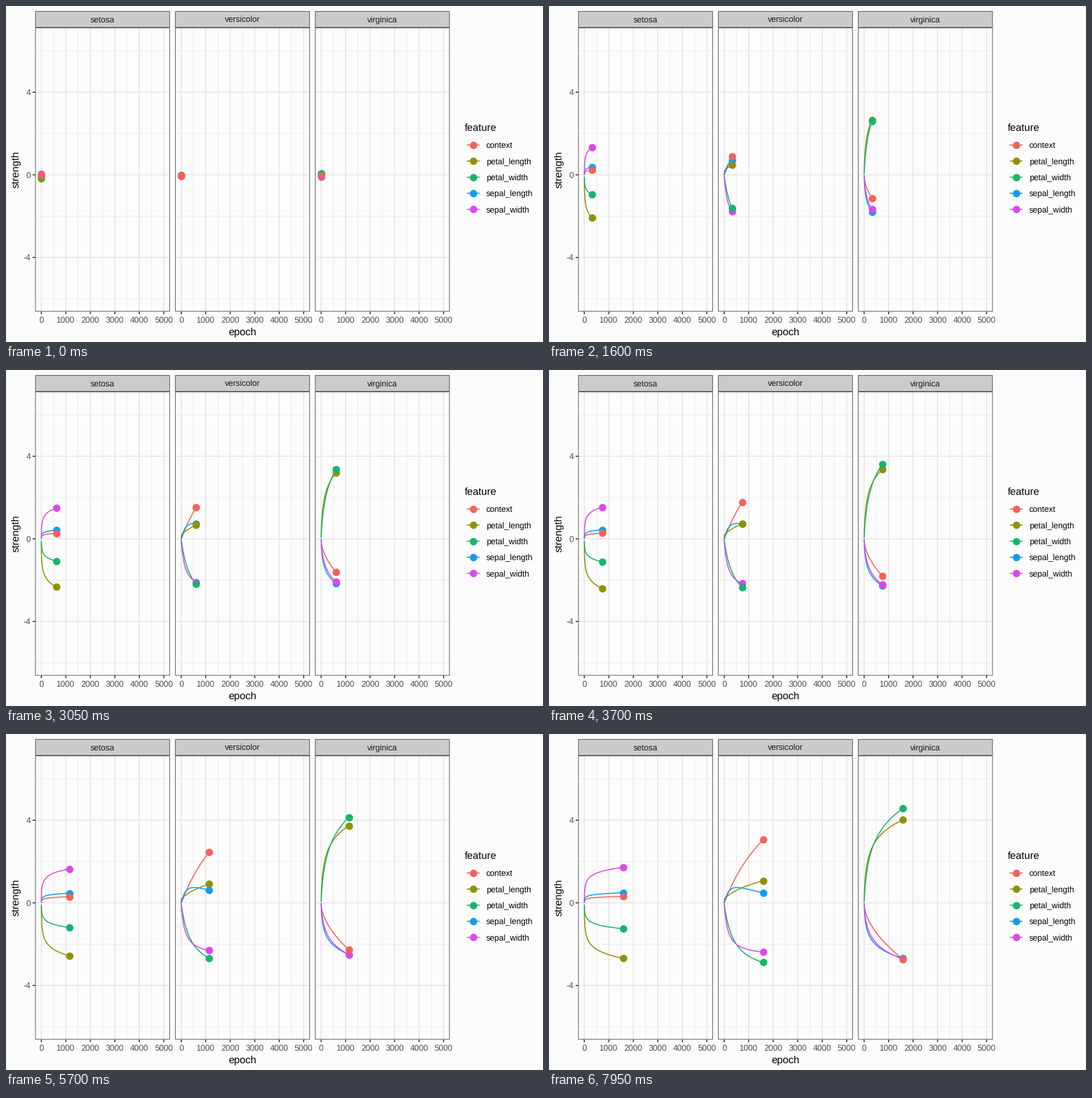
A matplotlib script for the animation above (8 s loop, 947x592 px).

```python
import numpy as np
import matplotlib.pyplot as plt
from matplotlib.animation import FuncAnimation
from matplotlib.patches import Rectangle

plt.rcParams["text.hinting"] = "none"

W, H, DPI = 947, 592, 100
PX = 72 / DPI  # points per pixel
FRAMES, INTERVAL, EPOCHS_PER_FRAME = 160, 50, 10

STRIP_TOP, TOP, BOTTOM = 9.1, 38.2, 538.4
LEFT, PANEL_W, GAP = 51.5, 237.6, 9.1
X_UNIT = PANEL_W / 5500  # 5000 epochs plus 5 % room on each side
ZERO_Y, Y_UNIT = 297.5, 36.4
THICK, THIN = 1.8, 0.9

COLORS = {
    "context": "#f3625b",
    "petal_length": "#8f9200",
    "petal_width": "#16b56c",
    "sepal_length": "#109cf2",
    "sepal_width": "#dc48ee",
}
# Points stack in this order, lines alphabetically
POINT_ORDER = ["sepal_length", "sepal_width", "petal_length", "petal_width", "context"]


# Learning curves: each returns a function of the epoch
def log(start, gain, scale):
    return lambda e: start + gain * np.log1p(e / scale)


def power(start, gain, exponent):
    return lambda e: start + gain * (e / 1000) ** exponent


def level(start, gain, half):
    return lambda e: start + gain * e / (e + half)


def settle(gain, tau):
    return lambda e: gain * (1 - np.exp(-e / tau))


def both(f, g):
    return lambda e: f(e) + g(e)


CURVES = {
    "setosa": {
        "context": log(0, .045, 1.6),
        "petal_length": log(-.18, -.378, 2.1),
        "petal_width": log(-.08, -.186, 2.9),
        "sepal_length": log(0, .067, 1.1),
        "sepal_width": log(.05, .244, 1.7),
    },
    "versicolor": {
        "context": log(-.03, 3.1, 930),
        "petal_length": both(log(0, .683, 620), settle(.2, 6)),
        "petal_width": level(-.03, -3.57, 400),
        "sepal_length": both(power(0, -.296, 1), settle(.95, 180)),
        "sepal_width": level(-.08, -2.53, 157),
    },
    "virginica": {
        "context": power(-.05, -2.07, .563),
        "petal_length": log(.05, .868, 16.6),
        "petal_width": log(.08, 1.343, 58),
        "sepal_length": log(0, -.558, 13),
        "sepal_width": log(-.1, -.694, 37),
    },
}


def to_y(value):
    return ZERO_Y - Y_UNIT * value


fig = plt.figure(figsize=(W / DPI, H / DPI), dpi=DPI, facecolor="#fcfcfc")
ax = fig.add_axes([0, 0, 1, 1])
ax.set_xlim(0, W)
ax.set_ylim(H, 0)
ax.axis("off")


def line(xs, ys, color, width, z):
    return ax.plot(xs, ys, color=color, lw=width * PX, zorder=z, snap=False,
                   solid_capstyle="butt", solid_joinstyle="round")[0]


def dot(x, y, color, z):
    return ax.plot([x], [y], "o", color=color, ms=13 * PX, mew=0, zorder=z,
                   snap=False)[0]


def text(x, y, s, size=14.5, color="black", ha="center", **kw):
    ax.text(x, y, s, fontsize=size * PX, color=color, ha=ha, va="baseline",
            family="Liberation Sans", rotation_mode="anchor", **kw)


def box(x, top, bottom, fill):
    """Panel-wide box whose border lies inside its edges."""
    ax.add_patch(Rectangle((x + THIN / 2, top + THIN / 2), PANEL_W - THIN,
                           bottom - top - THIN, facecolor=fill, edgecolor="#333333",
                           lw=THIN * PX, zorder=6, snap=False))


def grid_style(major):
    return ("#e5e5e3", THICK, 1) if major else ("#e8e8e8", THIN, 0.9)


def draw_panel(name, left, zero):
    for value in range(-6, 7, 2):
        line([left, left + PANEL_W], [to_y(value)] * 2, *grid_style(value % 4 == 0))
    for epoch in range(0, 5001, 500):
        major = epoch % 1000 == 0
        x = zero + epoch * X_UNIT
        line([x, x], [TOP, BOTTOM], *grid_style(major))
        if major:
            line([x, x], [BOTTOM, BOTTOM + 4.6], "#333333", THICK, 1)
            text(x, 557.5, str(epoch), color="#4d4d4d")
    box(left, TOP, BOTTOM, "none")
    box(left, STRIP_TOP, TOP, "#cbcbcb")
    text(left + PANEL_W / 2, 29, name, color="#1a1a1a", zorder=7)


epochs = np.arange(0, FRAMES * EPOCHS_PER_FRAME, 2)
traces = []
for k, (name, curves) in enumerate(CURVES.items()):
    left = LEFT + k * (PANEL_W + GAP)
    zero = left + 250 * X_UNIT
    draw_panel(name, left, zero)
    xs = zero + epochs * X_UNIT
    for j, (feature, color) in enumerate(COLORS.items()):
        path = line([], [], color, THICK, 2 + j / 10)
        head = dot(0, 0, color, 4 + POINT_ORDER.index(feature) / 10)
        traces.append((path, head, xs, to_y(curves[feature](epochs))))

for value in (-4, 0, 4):
    line([LEFT - 4.6, LEFT], [to_y(value)] * 2, "#333333", THICK, 1)
    text(43.3, to_y(value) + 5.2, str(value), color="#4d4d4d", ha="right")

text(417, 579, "epoch", 18.2)
text(22, 288.5, "strength", 18.2, rotation=90)

text(808.8, 219.8, "feature", 18.2, ha="left")
for j, (feature, color) in enumerate(COLORS.items()):
    y = 244.9 + 28.35 * j
    line([812.5, 835.3], [y, y], color, THICK, 2)
    dot(823.9, y, color, 3)
    text(846.7, y + 5.4, feature, ha="left")


def update(frame):
    n = frame * EPOCHS_PER_FRAME // 2
    for path, head, xs, ys in traces:
        path.set_data(xs[:n + 1], ys[:n + 1])
        head.set_data(xs[n:n + 1], ys[n:n + 1])
    return [artist for trace in traces for artist in trace[:2]]


anim = FuncAnimation(fig, update, frames=FRAMES, interval=INTERVAL,
                     repeat=True, repeat_delay=0, blit=False)
plt.show()
```
